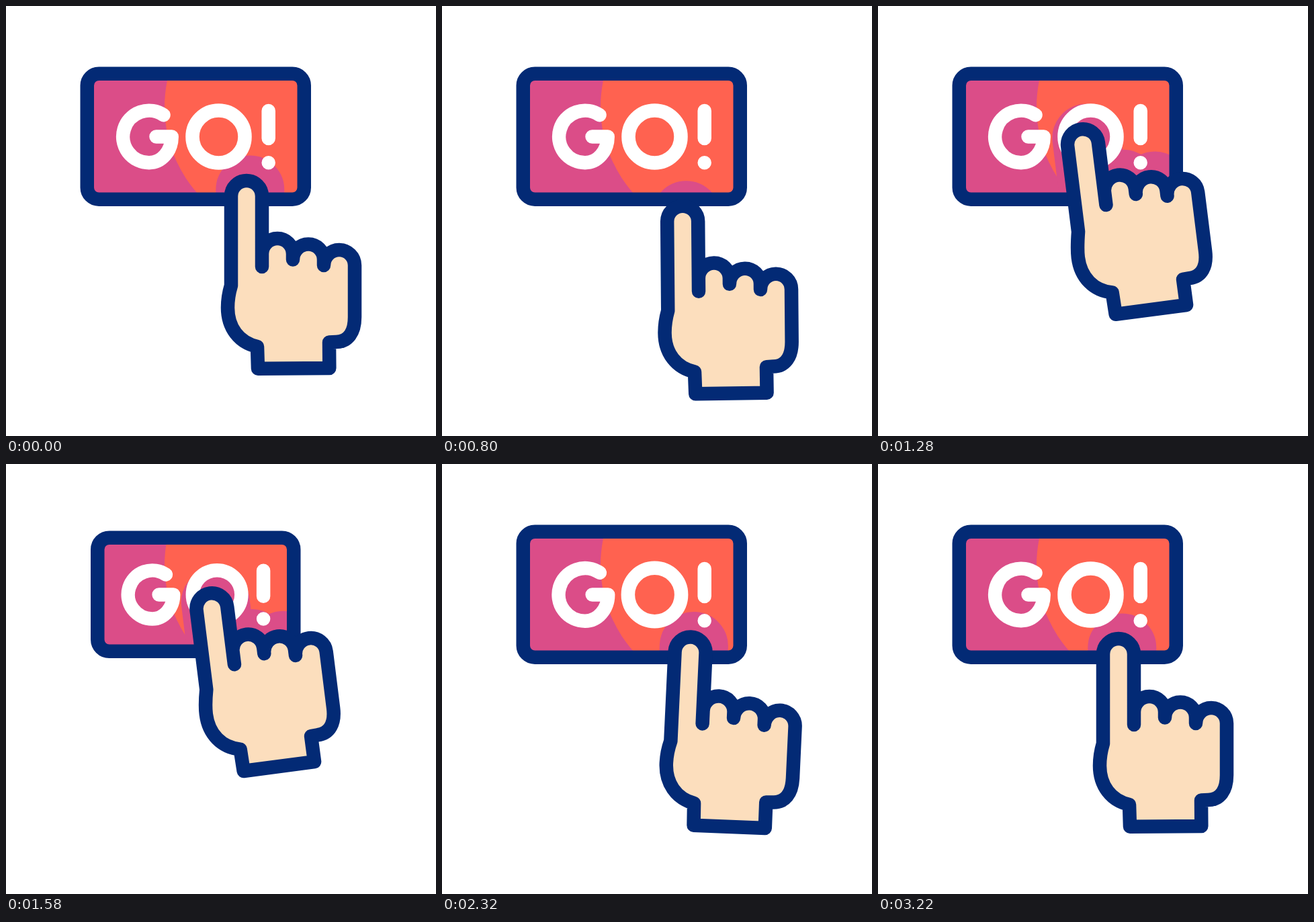
These frames come from a looping animation (640 px wide and 640 px high, 3600 ms). An HTML page:

```html
<!DOCTYPE html>
<html lang="en">
<head>
<meta charset="utf-8">
<title>Go button</title>
<style>
  html, body { margin: 0; width: 100%; height: 100%; overflow: hidden; background: #fff; }
  svg { display: block; width: 100vw; height: 100vh; }
  .line { stroke-width: 20.5; stroke-linecap: round; stroke-linejoin: round; fill: none; }
  .navy { stroke: #032a75; }
  .text path { stroke: #fff; vector-effect: non-scaling-stroke; }
</style>
</head>
<body>
<svg viewBox="0 0 640 640">
  <clipPath id="panel"><rect class="frame"/></clipPath>
  <g clip-path="url(#panel)">
    <rect width="640" height="640" fill="#db4d88"/>
    <circle cx="430" cy="150" r="194" fill="#ff6250"/>
    <path class="hand" id="shadow" fill="#db4d88" stroke="#db4d88" stroke-width="56" stroke-linejoin="round"/>
  </g>
  <rect class="frame line navy"/>
  <g class="text">
    <path id="g" class="line" d="M234.5 162.3A38.75 38.75 0 1 0 213 233.2A33.7 38.75 0 0 0 246.7 194.5H223.5"/>
    <path id="o" class="line" d="M277.5 194.5a39 39 0 1 0 78 0a39 39 0 1 0 -78 0z"/>
    <path id="bang" class="line" d="M390.7 156V197M390.7 233.3h.01"/>
  </g>
  <path class="hand line navy" id="hand" style="fill:#fcdebd"/>
</svg>
<script>
const LOOP = 3600;
const CENTER = { x: 282.25, y: 194.25 };
const LETTERS = [
  { id: "g", x: 213, start: 1720 },
  { id: "o", x: 316.5, start: 2280 },
  { id: "bang", x: 390.7, start: 2580 }
];
const $ = id => document.getElementById(id);
const all = selector => document.querySelectorAll(selector);

function progress(time, from, to) {
  return Math.min(1, Math.max(0, (time - from) / (to - from)));
}

function ease(time, from, to) {
  const u = progress(time, from, to);
  return u * u * (3 - 2 * u);
}

function pulse(time, start) {
  return 1 + 0.41 * Math.sin(Math.PI * progress(time, start, start + 640)) ** 2;
}

function handPath(lift, retract) {
  const kink = 416 - lift * 0.45, tip = 283 + retract;
  let knuckles = "";
  for (let i = 0; i < 3; i++) {
    const x = 381 + 46 * i, y = 369 + 8.5 * i - lift;
    const slot = (i ? 372 + 5 * i : 388) - lift;
    knuckles += `V${slot}V${y}A23 23 0 0 1 ${x + 46} ${y}`;
  }
  return `M335 ${kink}V${tip}A23 23 0 0 1 381 ${tip}${knuckles}` +
    "V463C519 486 509 500 491 500L481 500.5L481.3 539L375 539.7L374 507" +
    `C347 501 330 479 330 449C330 437 332 426 335 ${kink}Z`;
}

function scaleAbout(x, y, s) {
  return `translate(${x} ${y}) scale(${s}) translate(${-x} ${-y})`;
}

function drawButton(time, pressed) {
  const scale = 1 - 0.096 * pressed;
  const width = 323 * scale, height = 187 * scale;
  const box = { x: CENTER.x - width / 2, y: CENTER.y - height / 2, width, height, rx: 17.5 };
  for (const rect of all(".frame"))
    for (const name in box) rect.setAttribute(name, box[name]);

  const base = scaleAbout(CENTER.x, CENTER.y, 1 - 0.07 * pressed);
  for (const { id, x, start } of LETTERS)
    $(id).setAttribute("transform", `${base} ${scaleAbout(x, 194.5, pulse(time, start))}`);
}

function drawHand(time, press, pressed) {
  // Pull back, swing towards the button, then return with an overshoot.
  const pull = ease(time, 360, 760);
  const swing = ease(time, 760, 1020);
  const release = ease(time, 1600, 2000);
  const settle = ease(time, 2160, 2480);

  const x = 2.4 * pull - 25 * ease(time, 780, 1180) + 22.6 * release;
  const y = 38 * pull - 122 * ease(time, 780, 1320) + 81 * release + 3 * settle;
  const angle = -7.1 * swing + 12.5 * ease(time, 1600, 2170) - 5.4 * settle;
  const lift = 11.5 * swing - 4 * press - 7.5 * release;

  const pose = `translate(${x} ${y}) rotate(${angle} 386 530)`;
  for (const el of all(".hand")) el.setAttribute("d", handPath(lift, 11 * pressed));
  $("hand").setAttribute("transform", pose);
  $("shadow").setAttribute("transform", `translate(5.3 -9.5) ${pose}`);
}

function draw(time) {
  const press = ease(time, 1300, 1460);
  const pressed = press - ease(time, 1600, 1760);
  drawButton(time, pressed);
  drawHand(time, press, pressed);
}

const start = performance.now();
function tick() {
  draw((performance.now() - start) % LOOP);
  requestAnimationFrame(tick);
}
tick();
</script>
</body>
</html>
```
